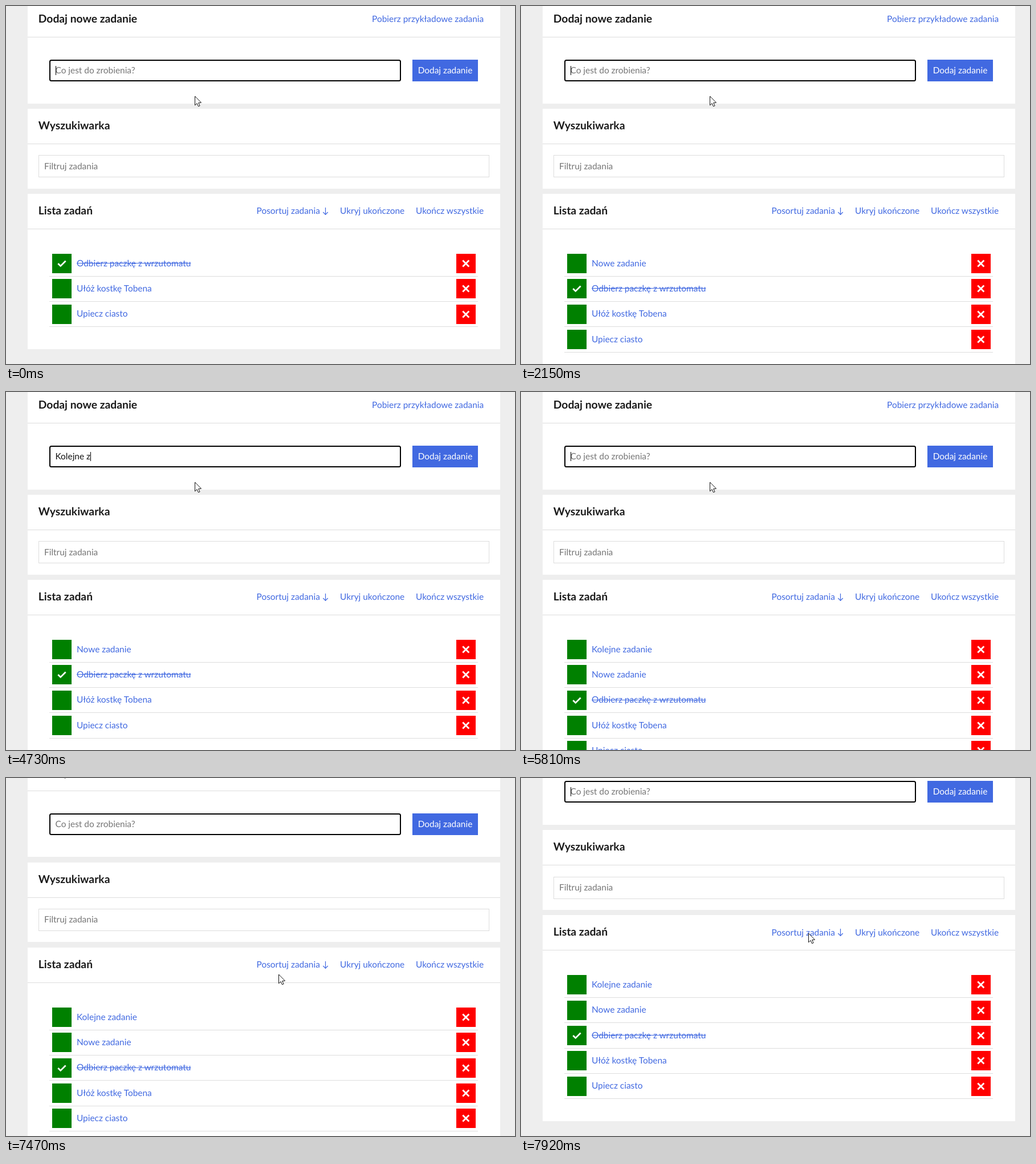
Write an HTML page with a canvas that moves like this. It is 893x627 px and loops after 8 s.

```html
<!DOCTYPE html>
<html lang="pl">
<head>
<meta charset="utf-8">
<title>Lista zadań</title>
<style>
html, body { margin: 0; width: 100%; height: 100%; overflow: hidden; background: #eee; }
canvas { display: block; }
</style>
</head>
<body>
<canvas id="stage" width="893" height="627"></canvas>
<script>
const ctx = document.getElementById('stage').getContext('2d');
const LOOP = 8000;
const BLUE = '#4169e1', LINE = '#ddd', GREY = '#757575', INK = '#1a1a1a';
const BODY = '15.42px Lato, "Open Sans", sans-serif';
const HEAD = 'bold 19.27px Lato, "Open Sans", sans-serif';
const ROW_TOP = 434, ROW_STEP = 44.36, MAX_SCROLL = 88.7;

const baseTasks = [
  { name: 'Odbierz paczkę z wrzutomatu', done: true },
  { name: 'Ułóż kostkę Tobena' },
  { name: 'Upiecz ciasto' }
];
const added = [
  { at: 2150, name: 'Nowe zadanie' },
  { at: 5810, name: 'Kolejne zadanie' }
];

// Moments at which the next typed character appears
const typing = [
  { word: added[0], keys: [610, 690, 760, 830, 1000, 1230, 1310, 1380, 1460, 1610, 1690, 1770] },
  { word: added[1], keys: [3390, 3540, 3710, 3790, 3940, 4090, 4260, 4330, 4730, 4810, 4880, 4960, 5110, 5110, 5190] }
];
const caretOff = [[360, 610], [2700, 3160], [5740, 5810], [6360, 6910], [7370, 7840]];
const ticks = [6760, 6830, 6910, 6990, 7060, 7140, 7220, 7290, 7370, 7470, 7540, 7610, 7690, 7770, 7840, 7920];

const clamp = v => Math.max(0, Math.min(1, v));
const progress = (t, a, b) => clamp((t - a) / (b - a));
const smooth = u => u * u * (3 - 2 * u);
const mix = (a, b, u) => a + (b - a) * u;

function snap(t) {
  let last = 0;
  for (const k of ticks) if (k <= t) last = k;
  return last;
}

function pointer(t) {
  const a = smooth(progress(t, 6690, 7360));
  const b = smooth(progress(t, 7560, 7910));
  return [Math.round(mix(331, 478, a) + 26 * b), Math.round(mix(158, 344, a) - 72 * b)];
}

function scrollAt(t) {
  return MAX_SCROLL * (1 - Math.pow(1 - progress(t, 7400, 7770), 2.15));
}

function typedAt(t) {
  for (const { word, keys } of typing) {
    if (t >= keys[0] && t < word.at) return word.name.slice(0, keys.filter(k => k <= t).length);
  }
  return '';
}

let scroll = 0;
const sy = y => Math.round(y - scroll);

function box(x, top, right, bottom, color) {
  ctx.fillStyle = color;
  ctx.fillRect(x, sy(top), right - x, sy(bottom) - sy(top));
}

function rule(x, y, right, color = LINE) {
  ctx.fillStyle = color;
  ctx.fillRect(x, Math.floor(y - scroll), right - x, 1);
}

function text(str, x, y, color, font = BODY, align = 'left') {
  ctx.font = font;
  ctx.fillStyle = color;
  ctx.textAlign = align;
  ctx.fillText(str, x, y - scroll);
}

function stroke(points, color, width) {
  ctx.beginPath();
  for (const [x, y] of points) ctx.lineTo(x, y);
  ctx.strokeStyle = color;
  ctx.lineWidth = width;
  ctx.stroke();
}

function panel(top, bottom, title, divider) {
  box(38, top, 867, bottom, '#fff');
  rule(38, divider, 867);
  text(title, 56.8, divider - 25.4, INK, HEAD);
}

function link(str, right, y) {
  text(str, right, y, BLUE, BODY, 'right');
}

function drawForm(t) {
  panel(-30, 170.6, 'Dodaj nowe zadanie', 54.2);
  link('Pobierz przykładowe zadania', 838.2, 28.1);

  ctx.beginPath();
  ctx.roundRect(77, sy(94) + 1, 615, 36, 2.5);
  ctx.strokeStyle = '#000';
  ctx.lineWidth = 2;
  ctx.stroke();

  const typed = typedAt(t);
  text(typed || 'Co jest do zrobienia?', 86.5, 117.7, typed ? '#111' : GREY);
  if (!caretOff.some(([a, b]) => t >= a && t < b)) {
    const x = Math.round(86.5 + ctx.measureText(typed).width);
    ctx.fillStyle = '#000';
    ctx.fillRect(x, sy(105), 1, 16);
  }

  box(713, 94, 828, 132, BLUE);
  text('Dodaj zadanie', 770.5, 117.7, '#fff', BODY, 'center');
}

function drawSearch() {
  panel(180.2, 319.5, 'Wyszukiwarka', 241.2);
  ctx.strokeStyle = LINE;
  ctx.lineWidth = 1;
  ctx.strokeRect(57.5, sy(261.4) + 0.5, 790, 38);
  text('Filtruj zadania', 67, 285.5, GREY);
}

function drawRow(task, i) {
  const top = ROW_TOP + i * ROW_STEP;
  const y = sy(top), mid = y + 17;
  ctx.fillStyle = '#008000';
  ctx.fillRect(81, y, 34, 34);
  ctx.fillStyle = '#f00';
  ctx.fillRect(790, y, 34, 34);
  stroke([[801.3, mid - 5.5], [812.3, mid + 5.5]], '#fff', 2.8);
  stroke([[812.3, mid - 5.5], [801.3, mid + 5.5]], '#fff', 2.8);
  text(task.name, 124, top + 21.7, BLUE);
  if (task.done) {
    const w = ctx.measureText(task.name).width;
    ctx.fillRect(124, y + 16, w, 1);
    stroke([[91.3, mid], [95.7, mid + 4.4], [104.6, mid - 4.5]], '#fff', 2.7);
  }
  rule(76, top + 39.2, 828);
}

function drawList(t) {
  const tasks = [...added.filter(a => t >= a.at).reverse(), ...baseTasks];
  panel(329.1, 468 + tasks.length * ROW_STEP, 'Lista zadań', 390.4);
  link('Posortuj zadania', 550.8, 364.3);
  link('Ukryj ukończone', 699.2, 364.3);
  link('Ukończ wszystkie', 838.2, 364.3);
  const y = sy(365);
  stroke([[560.5, y - 12], [560.5, y]], BLUE, 1.2);
  stroke([[556.3, y - 4], [560.5, y + 0.3], [564.7, y - 4]], BLUE, 1.2);
  tasks.forEach(drawRow);
}

function drawPointer(x, y) {
  const shape = [[0, 0], [0, 15.8], [3.6, 12.5], [6, 17.8], [8.6, 16.7], [6.2, 11.6], [11, 11.2]];
  ctx.beginPath();
  for (const [dx, dy] of shape) ctx.lineTo(x + 0.5 + dx, y + dy);
  ctx.closePath();
  ctx.fillStyle = '#fff';
  ctx.fill();
  ctx.strokeStyle = '#111';
  ctx.lineWidth = 1;
  ctx.stroke();
}

function draw(t) {
  const moved = snap(t);
  scroll = scrollAt(moved);
  ctx.fillStyle = '#eee';
  ctx.fillRect(0, 0, 893, 627);
  drawForm(t);
  drawSearch();
  drawList(t);
  drawPointer(...pointer(moved));
}

ctx.textRendering = 'geometricPrecision';
const start = performance.now();
function loop() {
  draw((performance.now() - start) % LOOP);
  requestAnimationFrame(loop);
}
loop();
</script>
</body>
</html>
```
